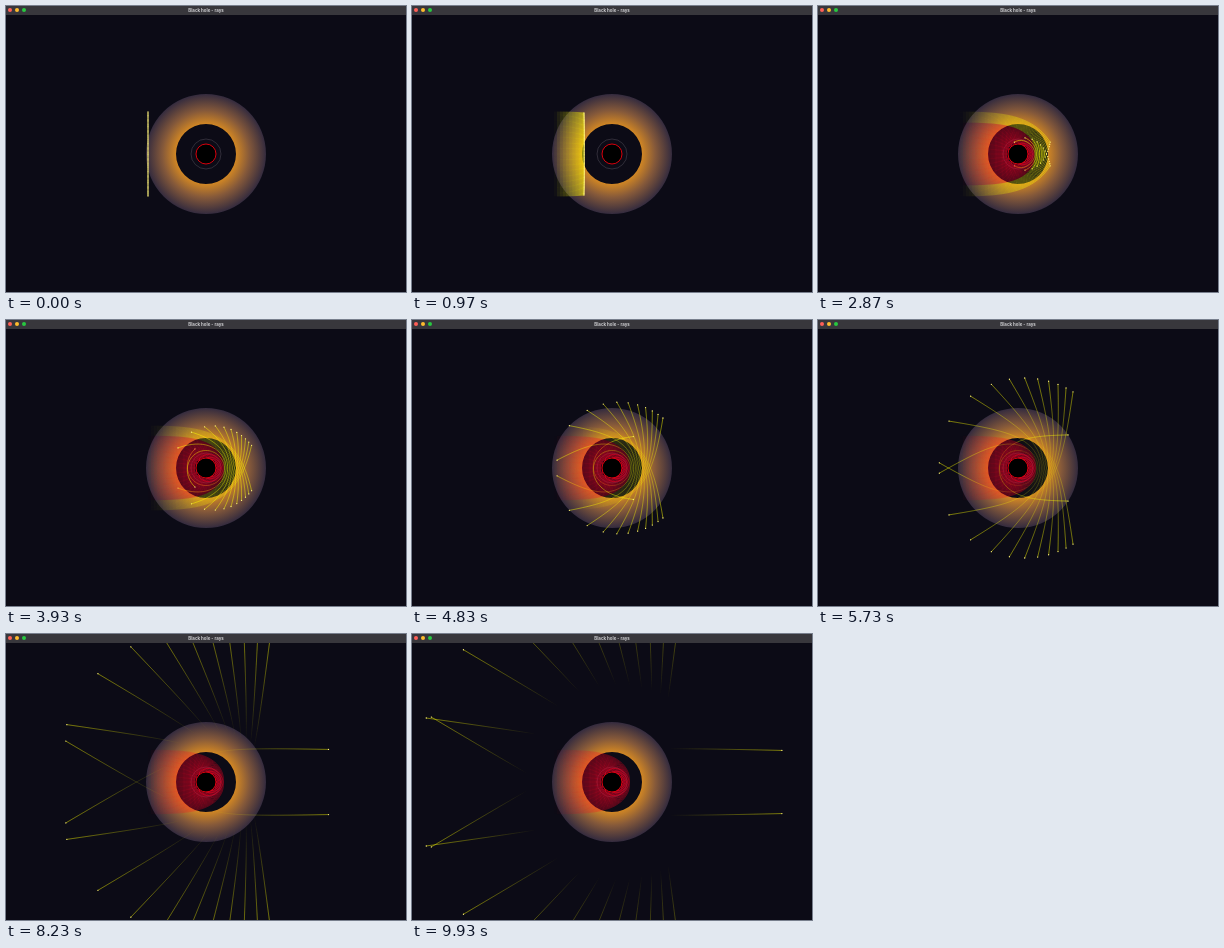
Recreate the animation shown at these times as an HTML page with a canvas. Size 400 by 286 pixels, loop 9.96 s.

```html
<!DOCTYPE html>
<html lang="en">
<head>
<meta charset="utf-8">
<title>Black hole - rays</title>
<style>
  html, body { margin: 0; width: 100%; height: 100%; overflow: hidden; background: #0c0b16; }
  canvas { position: absolute; left: 0; top: 0; }
  header { position: absolute; left: 0; top: 0; width: 400px; height: 8.6px; background: #38373c;
    color: #cfcfd2; font: bold 4.4px/9px Inter, sans-serif; text-align: center; }
  i { position: absolute; top: 2px; width: 4.4px; height: 4.4px; border-radius: 50%; }
</style>
</head>
<body>
<canvas id="stage" width="400" height="286"></canvas>
<header>
  <i style="left:2px;background:#ff5f57"></i><i style="left:9px;background:#febc2e"></i><i style="left:15.6px;background:#28c840"></i>
  Black hole - rays
</header>
<script>
const ctx = document.getElementById('stage').getContext('2d');
const LOOP = 9960, STEP = 100 / 3, STEPS = 300;
const CX = 200, CY = 148, RS = 10;
const RAYS = 100, START_X = -58, SPREAD = 42, TRAIL = 120, CHUNK = 3, SUBSTEPS = 32;
const GRAVITY = 0.628, CURVATURE = 1.5;

// Path of one ray, one point per step, moving one pixel per step at the start.
function trace(y) {
  let x = START_X, vx = 1, vy = 0;
  const h = 1 / SUBSTEPS, L2 = y * y, points = [[x, y]];
  while (points.length <= STEPS) {
    for (let k = 0; k < SUBSTEPS; k++) {
      x += vx * h / 2; y += vy * h / 2;
      const r = Math.hypot(x, y);
      if (r < RS) return { points, captured: true };
      const pull = RS * (GRAVITY + CURVATURE * L2 / (r * r)) / r ** 3;
      vx -= x * pull * h; vy -= y * pull * h;
      x += vx * h / 2; y += vy * h / 2;
    }
    points.push([x, y]);
  }
  return { points, captured: false };
}

const rays = Array.from({ length: RAYS }, (_, i) => trace(SPREAD * (2 * i / (RAYS - 1) - 1)));

const glow = ctx.createRadialGradient(0, 0, 30, 0, 0, 60);
glow.addColorStop(0, '#d08624');
glow.addColorStop(0.45, '#85593a');
glow.addColorStop(1, '#342b3e');

function circle(x, y, r) {
  ctx.beginPath();
  ctx.arc(x, y, r, 0, 2 * Math.PI);
}

function drawHole() {
  circle(0, 0, 60);
  ctx.arc(0, 0, 30, 0, 2 * Math.PI, true);
  ctx.fillStyle = glow;
  ctx.fill();
  circle(0, 0, 15);
  ctx.lineWidth = 0.5;
  ctx.strokeStyle = '#55515c';
  ctx.stroke();
  circle(0, 0, RS);
  ctx.fillStyle = '#000';
  ctx.fill();
  ctx.lineWidth = 1;
  ctx.strokeStyle = '#d8000c';
  ctx.stroke();
}

function drawRay({ points, captured }, step) {
  const last = Math.min(step, points.length - 1);
  const first = Math.max(0, last - TRAIL);
  const swallowed = captured && step >= points.length;
  ctx.strokeStyle = swallowed ? '#ff0028' : '#ffff00';
  ctx.lineWidth = 0.5;
  for (let i = first; i < last; i += CHUNK) {
    const end = Math.min(i + CHUNK, last);
    ctx.globalAlpha = (i + end - 2 * first) / 2 / (last - first);
    ctx.beginPath();
    for (let j = i; j <= end; j++) ctx.lineTo(...points[j]);
    ctx.stroke();
  }
  ctx.globalAlpha = 1;
  if (swallowed) return;
  circle(...points[last], 0.65);
  ctx.fillStyle = '#fff27a';
  ctx.fill();
}

function draw(now) {
  const step = Math.floor(now % LOOP / STEP + 0.1);
  ctx.setTransform(1, 0, 0, 1, 0, 0);
  ctx.clearRect(0, 0, 400, 286);
  ctx.translate(CX, CY);
  drawHole();
  for (const ray of rays) drawRay(ray, step);
  requestAnimationFrame(draw);
}
requestAnimationFrame(draw);
</script>
</body>
</html>
```
